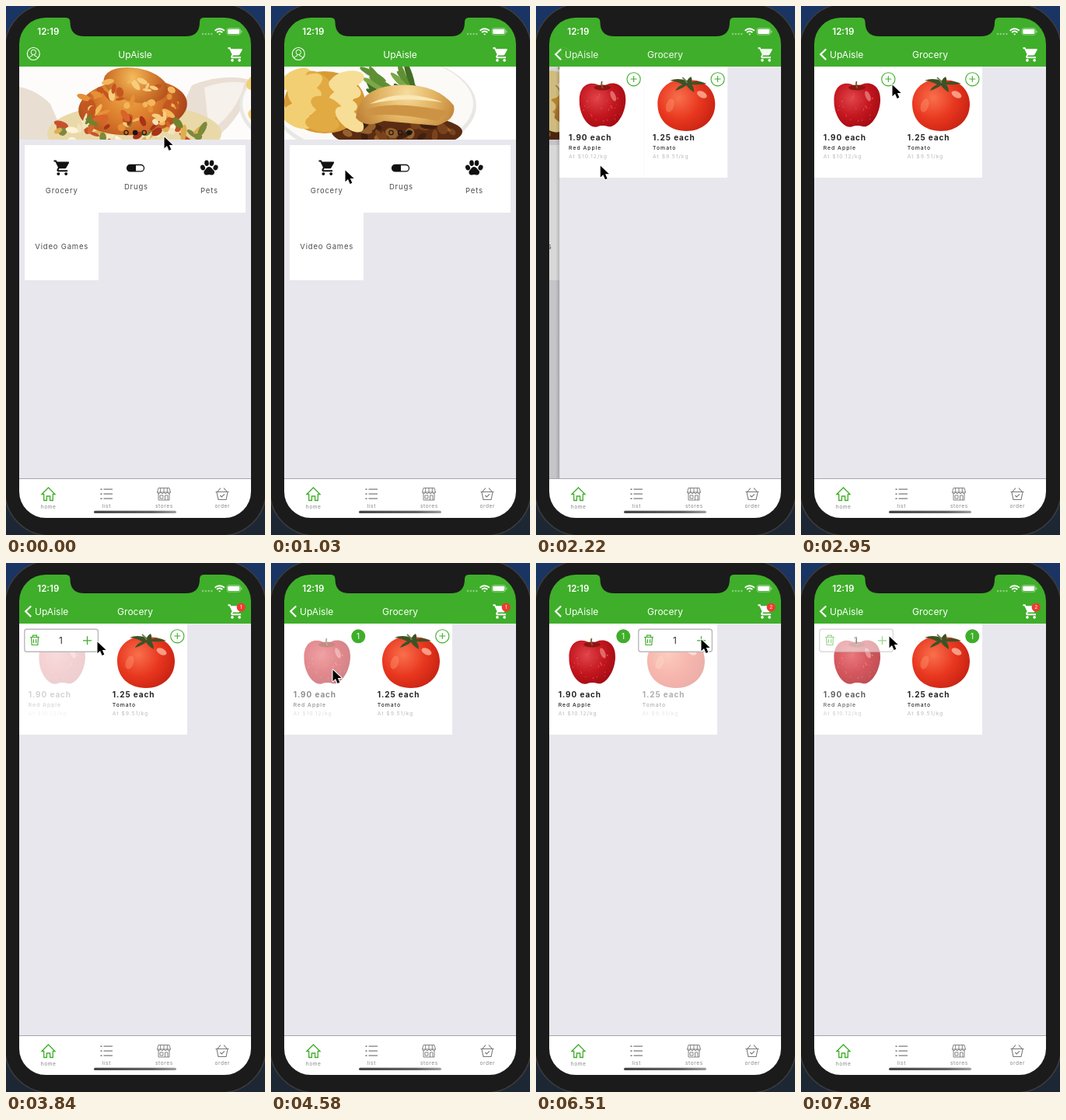
Write an HTML page with a canvas that moves like this. It is 333 px wide and 681 px high and loops after 7990 ms.

```html
<!DOCTYPE html>
<html lang="en">
<head>
<meta charset="utf-8">
<title>Shop app</title>
<style>
html, body { margin: 0; width: 100%; height: 100%; overflow: hidden; background: #1b1b1b; }
canvas { display: block; width: 333px; height: 681px; }
</style>
</head>
<body>
<canvas id="stage"></canvas>
<script>
const W = 333, H = 681, LOOP = 7990, STEP = 148;
const GREEN = '#3fae2a', PAGE = '#e8e7ed', SHOP = 'UpAisle';
const canvas = document.getElementById('stage');
const dpr = window.devicePixelRatio || 1;
canvas.width = W * dpr;
canvas.height = H * dpr;
const c = canvas.getContext('2d');

const clamp = (v, a = 0, b = 1) => Math.min(b, Math.max(a, v));
const ramp = (t, from, len) => clamp((t - from) / len);
const smooth = v => v * v * (3 - 2 * v);

// pointer stops: time, x, y
const POINTER = [
  [0, 203, 168], [148, 208, 155], [296, 207, 157], [444, 207, 157], [740, 160, 172],
  [888, 115, 200], [1036, 95, 211], [1480, 81, 216], [1924, 81, 216], [2368, 83, 200],
  [2812, 97, 130], [2960, 117, 101], [3848, 117, 101], [4440, 79, 137], [4588, 79, 137],
  [5180, 217, 96], [5624, 217, 98], [5772, 223, 120], [5920, 200, 148], [6068, 165, 128],
  [6216, 212, 98], [6512, 212, 98], [7250, 103, 99], [7548, 111, 96], [7844, 113, 94]
];

function pointerAt(t) {
  let i = 1;
  while (i < POINTER.length - 1 && POINTER[i][0] < t) i++;
  const [t0, x0, y0] = POINTER[i - 1], [t1, x1, y1] = POINTER[i];
  const k = ramp(t, t0, t1 - t0);
  return [x0 + (x1 - x0) * k, y0 + (y1 - y0) * k];
}

function text(s, x, y, size, color, { weight = 400, align = 'left', space = 0 } = {}) {
  c.font = `${weight} ${size}px Inter, Roboto, sans-serif`;
  c.letterSpacing = space + 'px';
  c.textAlign = align;
  c.fillStyle = color;
  c.fillText(s, x + (align === 'center' ? space / 2 : 0), y);
}

function rect(x, y, w, h, color) {
  c.fillStyle = color;
  c.fillRect(x, y, w, h);
}

function round(x, y, w, h, r) {
  c.beginPath();
  c.roundRect(x, y, w, h, r);
}

function oval(x, y, rx, ry, color, turn = 0) {
  c.beginPath();
  c.ellipse(x, y, rx, ry, turn, 0, Math.PI * 2);
  c.fillStyle = color;
  c.fill();
}

function ring(x, y, r, color, width = 1) {
  c.beginPath();
  c.arc(x, y, r, 0, Math.PI * 2);
  c.strokeStyle = color;
  c.lineWidth = width;
  c.stroke();
}

function line(d, color, width = 1) {
  c.strokeStyle = color;
  c.lineWidth = width;
  c.stroke(new Path2D(d));
}

function shape(d, color) {
  c.fillStyle = color;
  c.fill(new Path2D(d));
}

function glow(x, y, r, ...stops) {
  const g = c.createRadialGradient(x, y, 0, x, y, r);
  stops.forEach((s, i) => g.addColorStop(i / (stops.length - 1), s));
  return g;
}

function at(x, y, draw, scale = 1) {
  c.save();
  c.translate(x, y);
  c.scale(scale, scale);
  draw();
  c.restore();
}

function faded(alpha, draw) {
  if (alpha <= 0) return;
  c.save();
  c.globalAlpha *= alpha;
  draw();
  c.restore();
}

function clipped(x, y, w, h, draw) {
  c.save();
  c.beginPath();
  c.rect(x, y, w, h);
  c.clip();
  draw();
  c.restore();
}

function bits(seed, count, x, y, rx, ry, size, colors) {
  const rnd = () => (seed = (seed * 16807) % 2147483647) / 2147483647;
  for (let i = 0; i < count; i++) {
    const a = rnd() * Math.PI * 2, d = Math.sqrt(rnd());
    oval(x + Math.cos(a) * d * rx, y + Math.sin(a) * d * ry,
      size * (0.6 + rnd()), size * (0.3 + rnd() * 0.5), colors[i % colors.length], rnd() * 3);
  }
}

const CART = 'M7 18a2 2 0 1 0 .01 0zM17 18a2 2 0 1 0 .01 0zM1 2v2h2l3.6 7.6-1.35 2.4C4.5 15.4 5.5 17 7 17h12v-2H7.4' +
  'q-.3-.1-.2-.4l.9-1.6h7.45q1.2 0 1.75-1l3.6-6.5Q21.5 4 20 4H5.2l-.9-2z';

function cart(x, y, scale, color) {
  at(x, y, () => shape(CART, color), scale);
}

// banner slides, 298 x 94
function slideChicken() {
  rect(0, 0, 298, 94, '#fdfcfa');
  shape('M0 26Q22 30 40 48L60 94H0z', '#e8dfd2');
  shape('M222 24Q262 8 297 17Q292 62 250 94H190z', '#e9dfd5');
  shape('M238 27Q266 17 290 21Q280 60 244 84z', '#f6f1ea');
  oval(148, 86, 112, 38, '#e9d9a8');
  bits(31, 60, 150, 84, 104, 28, 7, ['#f5e8c0', '#dfae4f', '#7c8a3b', '#fff4d8', '#c9502a']);
  oval(146, 52, 70, 36, glow(140, 34, 78, '#f0ad48', '#d9792b', '#a8421a'), -0.08);
  oval(150, 24, 42, 22, glow(146, 14, 48, '#f4bb5d', '#d88432', '#b5541d'), 0.2);
  bits(77, 46, 146, 46, 64, 34, 6, ['#f3b65a', '#c4561f', '#e59036', '#f7cd7e']);
  bits(9, 24, 140, 76, 80, 14, 6, ['#a8321a', '#d8642a', '#f1e3bd', '#71822c']);
}

function slidePie() {
  rect(0, 0, 298, 94, '#ffffff');
  oval(116, 50, 131, 68, '#e9e7e4');
  oval(116, 48, 127, 65, '#fbfaf7');
  oval(145, 84, 84, 22, '#5a2c12');
  bits(53, 26, 145, 84, 72, 14, 8, ['#7b431c', '#40200f', '#95602c']);
  for (let i = 0; i < 14; i++)
    oval(114 + (i * 37) % 72, 10 + (i * 11) % 30, 19, 4, ['#5f8f35', '#7ba748', '#426f24'][i % 3], 0.5 + (i % 4) * 0.25);
  oval(52, 46, 52, 40, '#d79a35');
  for (let i = 0; i < 16; i++)
    oval(14 + (i * 29) % 84, 16 + (i * 17) % 62, 22, 11, ['#f2cf72', '#e2aa43', '#f7de96'][i % 3], -0.5 + (i % 5) * 0.3);
  shape('M92 66Q96 28 142 24Q194 20 218 50Q222 68 196 76L128 70Q104 80 92 66z', glow(158, 34, 72, '#f6dc9d', '#e2b362', '#bd7f35'));
  shape('M104 56Q136 42 212 58L196 70Q140 58 104 64z', '#cd9344');
  shape('M110 48Q150 26 204 46Q152 38 110 48z', '#f9e7b5');
}

function banner(pos) {
  clipped(17, 78, 298, 94, () => {
    [slideChicken, slidePie].forEach((draw, i) => at(17 + (i - pos) * 298, 78, draw));
  });
  for (let i = 0; i < 3; i++) {
    const x = 154.5 + i * 11.6;
    ring(x, 163, 2.7, '#151515', 1.1);
    if (i === 1 + Math.round(pos)) oval(x, 163, 3, 3, '#151515');
  }
}

function paw() {
  oval(253, 208, 2.9, 3.6, '#111', -0.4);
  oval(258, 202.3, 2.8, 3.7, '#111', -0.1);
  oval(264.5, 202.3, 2.8, 3.7, '#111', 0.1);
  oval(269.5, 208, 2.9, 3.6, '#111', 0.4);
  shape('M261 207C264 207 265 210 267.5 212C269 215 267 218 264 217.5Q261 216.5 258.5 217.5C255 218 253.5 215 255 212C257.5 210 258 207 261 207z', '#111');
}

function homePage(pos, press) {
  rect(17, 78, 298, 530, PAGE);
  banner(pos);
  rect(24, 179, 284, 87, '#fff');
  rect(24, 265, 95, 88, '#fff');
  const label = (s, x, y) => text(s, x, y, 9.5, '#4b4b4d', { align: 'center', space: 0.8 });
  cart(60.5, 196.5, 0.98, '#111');
  label('Grocery', 71.3, 241);
  rect(24, 180, 95, 84, `rgba(255,255,255,${press})`);
  round(155.5, 204.5, 22, 8.4, 4.2);
  c.strokeStyle = '#111';
  c.lineWidth = 1.3;
  c.stroke();
  round(155.5, 204.5, 11.5, 8.4, [4.2, 0, 0, 4.2]);
  c.fillStyle = '#111';
  c.fill();
  label('Drugs', 167, 236);
  paw();
  label('Pets', 261, 241);
  label('Video Games', 71.3, 313);
}

function apple() {
  shape('M72 105C82 95 103 98 102 122C101 142 88 158 79 155Q72 153 65 155.5C54 158 42 140 42.5 122C42 99 60 95 72 105z',
    glow(65, 119, 46, '#e0454a', '#c4161f', '#98080f'));
  oval(72, 105, 11, 3.5, '#8f1511');
  oval(86, 116, 3, 7, 'rgba(255,205,190,.45)', -0.4);
  bits(17, 26, 72, 131, 25, 20, 0.8, ['#e4666a']);
  line('M72.5 106Q70 101 71.5 97', '#7a5a2c', 1.8);
}

function tomato() {
  shape('M72 97C88 91 109 104 109 126C109 148 92 161 72 161C50 161 35 147 35 126C35 103 56 91 72 97z',
    glow(62, 118, 56, '#f8704d', '#e8371f', '#c01d10'));
  oval(92, 114, 7, 4, 'rgba(255,190,165,.75)', 0.5);
  oval(51, 128, 5, 9, 'rgba(255,150,115,.4)', 0.3);
  shape('M73 96Q60 92 51 96Q60 97 67 101Q60 104 58 109Q67 106 72 102Q76 108 82 111Q82 105 79 101Q88 102 98 100Q88 95 79 98Q80 94 78 91Q74 93 73 96z', '#3d5226');
  line('M73 99Q71 95 67 92', '#75824b', 1.8);
}

const ITEMS = [
  { draw: apple, price: '1.90 each', name: 'Red Apple', unit: 'At $10.12/kg', spans: [[3440, 4455], [7740, 9999]], added: 3440 },
  { draw: tomato, price: '1.25 each', name: 'Tomato', unit: 'At $9.51/kg', spans: [[5260, 6440]], added: 5260 }
];

// how visible an item and its stepper are at a time
function itemState(item, t) {
  const span = item.spans.filter(s => s[0] <= t).pop();
  const added = t > item.added;
  if (!span) return { show: 1, stepper: 0, added };
  const [open, close] = span;
  if (t < close) return { show: 1 - 0.8 * ramp(t, open, 300), stepper: ramp(t, open, 200), added };
  return { show: 0.2 + 0.8 * ramp(t, close, 350), stepper: t - close < 100 ? 1 : 0, added };
}

function stepper() {
  round(23.8, 85.3, 94.6, 29, 3);
  c.fillStyle = '#fff';
  c.fill();
  c.strokeStyle = '#b9b9bb';
  c.lineWidth = 1.4;
  c.stroke();
  line('M31 95.5H43M34.5 95V93.2H39.5V95M32.5 96L33.2 105.5H40.8L41.5 96M35.4 98.3V103M38.6 98.3V103', GREEN, 1.2);
  text('1', 70.5, 104.3, 12, '#333', { align: 'center' });
  line('M99 99.8H110M104.5 94.3V105.3', GREEN, 1.3);
}

function product(item, i, t) {
  const { show, stepper: open, added } = itemState(item, t);
  at(i * 108, 0, () => {
    rect(17, 78, 108, 143, '#fff');
    item.draw();
    text(item.price, 28.8, 173, 10, '#222', { weight: 700, space: 0.9 });
    text(item.name, 28.8, 185, 6.8, '#222', { weight: 500, space: 1 });
    text(item.unit, 28.8, 195.5, 6.8, '#bcbcbf', { space: 0.95 });
    rect(17, 78, 108, 143, `rgba(255,255,255,${1 - show})`);
    if (open) faded(open, stepper);
    else if (added) {
      oval(112.3, 94.3, 9, 9, GREEN);
      text('1', 112, 98, 10, '#fff', { align: 'center' });
    } else {
      oval(112.3, 94.3, 8.6, 8.6, '#fff');
      ring(112.3, 94.3, 8.6, GREEN, 1.1);
      line('M108.3 94H116.3M112.3 90V98', GREEN, 1.1);
    }
  });
}

function groceryPage(t) {
  rect(17, 78, 298, 530, PAGE);
  ITEMS.forEach((item, i) => product(item, i, t));
}

function pages(t, push) {
  clipped(17, 78, 298, 530, () => {
    if (push < 1) {
      const press = 0.8 * ramp(t, 1560, 150) * (1 - 0.35 * ramp(t, 1780, 150));
      at(-89.4 * push, 0, () => homePage(smooth(ramp(t, 560, 400)), press));
      rect(17, 78, 298, 530, `rgba(0,0,0,${0.16 * push})`);
    }
    if (push > 0) {
      at(298 * (1 - push), 0, () => {
        if (push < 1) {
          const g = c.createLinearGradient(12, 0, 17, 0);
          g.addColorStop(0, 'rgba(0,0,0,0)');
          g.addColorStop(1, 'rgba(0,0,0,.16)');
          rect(12, 78, 5, 530, g);
        }
        groceryPage(t);
      });
    }
  });
}

function header(t, push) {
  rect(17, 15, 298, 63, GREEN);
  const into = push * push;
  const title = (s, x = 166) => text(s, x, 66.5, 12, '#fff', { align: 'center' });
  faded(1 - into, () => {
    ring(35.3, 61.5, 8, '#fff', 1.1);
    ring(35.3, 59.5, 3.2, '#fff', 1);
    line('M29.5 67Q31 64.5 33.8 64V62.5M41 67Q39.5 64.5 36.8 64V62.5', '#fff', 1);
    title(SHOP);
    cart(284.5, 51.5, 0.92, '#fff');
  });
  faded(into, () => {
    line('M32.2 55.5L25.2 62.3L32.2 69.1', '#fff', 2.2);
    text(SHOP, 37, 66.8, 12, '#fff');
    title('Grocery');
    cart(284.5, 51.5, 0.92, '#fff');
  });
  const count = ITEMS.filter(item => t > item.added).length;
  if (count) {
    oval(302.2, 57, 5.6, 5.6, '#ee3b32');
    text(count, 302.2, 59.4, 6.5, '#fff', { align: 'center' });
  }
}

function statusBar() {
  text('12:19', 54.3, 37, 11.5, '#fff', { weight: 600, align: 'center' });
  for (let i = 0; i < 4; i++) oval(253 + i * 3.8, 36, 1.2, 1.2, 'rgba(255,255,255,.4)');
  [[9.3, 2], [5.9, 2], [2, 2.2]].forEach(([r, w]) => {
    c.beginPath();
    c.arc(274.7, 37.5, r - 1, -Math.PI * 0.76, -Math.PI * 0.24);
    c.strokeStyle = '#fff';
    c.lineWidth = w;
    c.stroke();
  });
  round(284, 28.6, 17.5, 8.6, 2.5);
  c.strokeStyle = 'rgba(255,255,255,.5)';
  c.lineWidth = 0.8;
  c.stroke();
  round(285.2, 29.8, 15.1, 6.2, 1.4);
  c.fillStyle = '#fff';
  c.fill();
  rect(302.4, 31.6, 1, 2.8, 'rgba(255,255,255,.6)');
}

function tabBar() {
  rect(17, 608, 298, 52, '#fff');
  rect(17, 608, 298, 1, '#a5a5a9');
  const gray = '#77777a';
  line('M46 628.5L54.5 620L63 628.5H60.3V636.5H56.6V631H52.4V636.5H48.7V628.5z', GREEN, 1.3);
  for (let y = 622; y < 636; y += 6) {
    rect(121.5, y - 0.6, 2, 1.6, gray);
    rect(125.5, y - 0.5, 11.5, 1.2, gray);
  }
  line('M196 620.5H210L211.5 626H194.5zM196 627V636H210V627M194.5 626Q196.5 629.5 198.7 626Q200.8 629.5 203 626Q205.2 629.5 207.3 626Q209.5 629.5 211.5 626' +
    'M198.7 620.5V626M203 620.5V626M207.3 620.5V626M198 630H202V634H198zM204.5 636V630H208V636', gray, 0.9);
  line('M269.5 625.5H286.5M271 626L273 635.5H283L285 626M272 625L276 620.5M284 625L280 620.5M275.3 630L277.3 632L281 628.3', gray, 1.1);
  [['home', 54.3, 647], ['list', 129, 645.5], ['stores', 203, 646], ['order', 278, 646]].forEach(([s, x, y]) =>
    text(s, x, y, 6.6, '#858588', { align: 'center', space: 0.6 }));
  const g = c.createLinearGradient(113, 0, 219, 0);
  g.addColorStop(0, '#454548');
  g.addColorStop(0.7, '#626265');
  g.addColorStop(1, '#a0a0a3');
  round(113, 649.7, 106, 3.4, 1.7);
  c.fillStyle = g;
  c.fill();
}

function phone() {
  const g = c.createLinearGradient(0, 0, 0, H);
  g.addColorStop(0, '#1a3564');
  g.addColorStop(1, '#1d2733');
  rect(0, 0, W, H, g);
  round(-1.5, -3, 336, 685, 58);
  c.fillStyle = '#1b1b1b';
  c.fill();
  c.strokeStyle = '#3c3c3e';
  c.lineWidth = 1.5;
  c.stroke();
}

function pointer(x, y) {
  at(x, y, () => {
    const d = 'M.5 .5V15.2L4 12L6.6 18L9.3 16.8L6.8 11H11.6z';
    c.lineJoin = 'round';
    line(d, '#fff', 2);
    shape(d, '#000');
  });
}

function draw(t) {
  c.setTransform(dpr, 0, 0, dpr, 0, 0);
  const raw = 1 - Math.exp(-Math.max(0, t - 1824) / 127.4);
  const push = t > 2450 ? 1 : raw;
  phone();
  c.save();
  round(17, 15, 298, 644, 34);
  c.clip();
  pages(t, push);
  header(t, push);
  statusBar();
  tabBar();
  shape('M77 14V15Q82.5 15 82.5 21Q82.5 39 101 39H231Q249 39 249 21Q249 15 254 15V14z', '#1b1b1b');
  c.restore();
  pointer(...pointerAt(t));
}

function tick(now) {
  const t = now % LOOP;
  draw(Math.min(53, Math.floor((t + 10) / STEP)) * STEP);
  requestAnimationFrame(tick);
}
requestAnimationFrame(tick);
</script>
</body>
</html>
```
